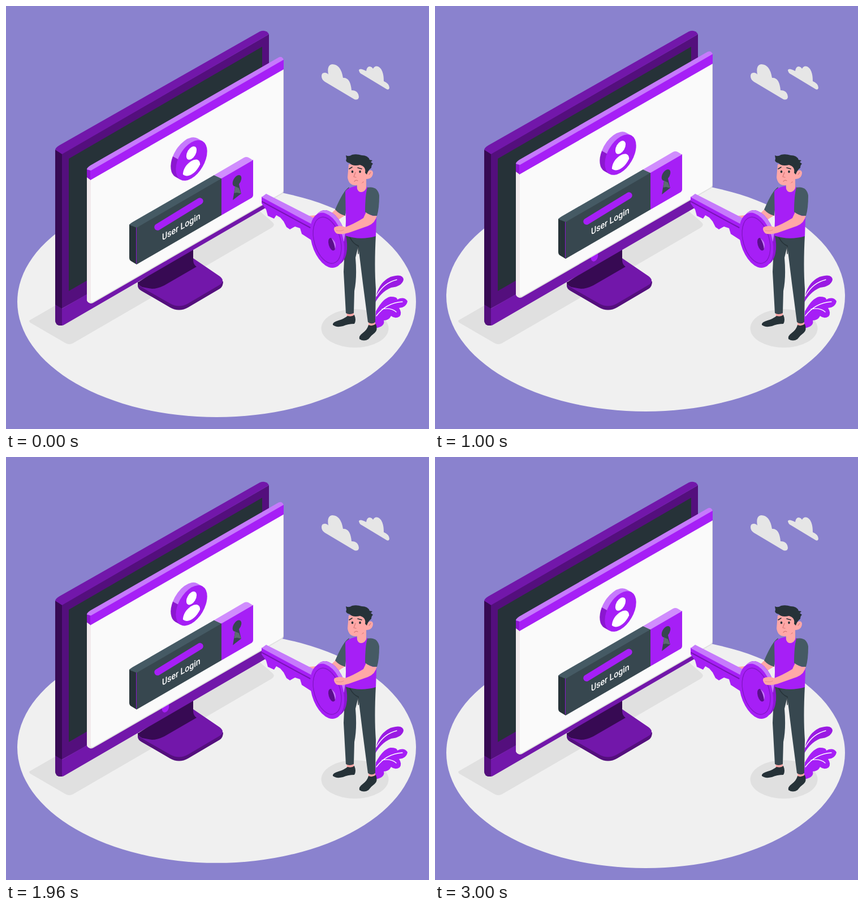
An HTML page that plays this animation: 748x748 px, repeating every 3040 ms.

```html
<!DOCTYPE html>
<html lang="en">
<head>
<meta charset="utf-8">
<title>User Login</title>
<style>
html, body { margin: 0; width: 100%; height: 100%; overflow: hidden; background: #8a82ce; }
svg { display: block; width: 100%; height: 100%; }
text { font: 500 16.3px Roboto, sans-serif; fill: #fff; }
.main { fill: #a61ff6; }
.light { fill: #c67afc; }
.deep { fill: #8b17cf; }
.mid { fill: #7217aa; }
.dark { fill: #540f7d; }
.night { fill: #370a53; }
.ink { fill: #263238; }
.slate { fill: #37474f; }
.steel { fill: #455a64; }
.skin { fill: #ffa8a7; }
.shade { fill: #e0e0e0; }
.cloud { fill: #e6e6e6; }
.line { fill: none; stroke-linecap: round; stroke-linejoin: round; }
</style>
</head>
<body>
<svg viewBox="0 0 748 748">
  <ellipse id="floor" cx="372.5" cy="523" rx="352.5" ry="204" fill="#f0f0f0"/>

  <g class="shade">
    <path d="M43 555L420 338L471 382Q477 387 470 392L119 596Q112 600 105 596L43 560Q39 557 43 555Z"/>
    <ellipse cx="617" cy="570" rx="59.5" ry="34"/>
  </g>

  <g id="clouds" class="cloud">
    <path d="M558 124Q558 117 565 118Q569 119 570 121Q567 104 577 103Q592 103 596 127Q609 126 611 149Q623 149 624 161Q623 167 616 165L564 134Q558 130 558 124Z"/>
    <path d="M624 113Q626 109 637 115Q638 108 642 107Q647 107 649 111Q652 105 658 107Q668 112 668 133Q678 137 678 145Q677 149 673 147L630 121Q624 118 624 113Z"/>
  </g>

  <g id="monitor">
    <path class="dark" d="M233 488L233 495Q233 500 240 504L290 533Q306 542 322 533L378 500Q384 496 384 487Z"/>
    <path class="mid" d="M233 489L331 446L378 478Q388 486 378 493L322 526Q306 535 290 526L239 497Q233 493 233 489Z"/>
    <path class="night" d="M233 489L274 462L331 428V449Q331 457 337 461L280 494Q268 500 258 500L241 497Q233 493 233 489Z"/>
    <path class="night" d="M87 254L99 261V565Q87 566 87 555Z"/>
    <path class="dark" d="M87 528L99 535V565Q87 566 87 555Z"/>
    <path class="dark" d="M99 261L465 50V330L99 535Z"/>
    <path class="mid" d="M87 254Q88 250 95 246L449 45Q460 41 465 50L99 262Z"/>
    <path class="ink" d="M111 270L453 72V307L111 504Z"/>
    <path class="mid" d="M99 535L465 324V345Q465 353 459 357L104 563Q101 565 99 565Z"/>
    <ellipse class="main" cx="282" cy="443" rx="6" ry="9" transform="rotate(18 282 443)"/>
  </g>

  <g id="panel">
    <path class="shade" d="M143 300L151 307L491 111V327Q491 331 487 333L154 525Q150 527 147 525Q143 523 143 519Z"/>
    <path fill="#f1e9ec" d="M143 302L150 307V525Q143 524 143 519Z"/>
    <path fill="#fafafa" d="M150 307L490 111V326Q490 329 487 331L154 523Q150 525 150 521Z"/>
    <path class="deep" d="M143 287L150 290V308L143 303Z"/>
    <path class="main" d="M149 290L491 94V112L149 308Z"/>
    <path class="light" d="M143 289Q143 286 149 282L482 91Q488 88 491 95L150 291Z"/>

    <g transform="matrix(.866 -.5 0 1 328 273)">
      <path class="light" d="M-27.7-16L-38.1-26.2A32 32 0 0 1 12.2-32.8L22.6-22.6Z"/>
      <path class="deep" d="M-27.7-16L-38.1-26.2A32 32 0 0 0-33 12.4L-22.6 22.6Z"/>
      <circle class="main" r="32"/>
      <g fill="#fff">
        <circle cy="-13" r="10.5"/>
        <path d="M-17.5 16C-17-4 17-4 17.5 16C8 28-8 28-17.5 16Z"/>
      </g>
    </g>

    <path class="ink" d="M218 386L231 391V457L221 451Q218 449 218 445Z"/>
    <path class="slate" d="M231 391L381 304V370L231 457Z"/>
    <path class="steel" d="M218 387Q219 385 224 382L368 299L381 305L231 392Z"/>
    <path class="main" d="M381 304L437 272V334Q437 338 433 340L381 370Z"/>
    <path d="M368 299L421 268Q425 266 429 268L434 271Q437 273 436 273L381 305Z" fill="#d08dfd"/>
    <path class="line" d="M230.5 392V455" stroke="#8b17cf"/>
    <path class="line" d="M268 391L343 345" stroke="#a61ff6" stroke-width="11.5"/>
    <g transform="matrix(.866 -.5 0 1 408.5 310)">
      <path class="slate" d="M-4 7A9 9 0 1 1 4 7L8.5 26L-8.5 29Z"/>
      <path fill="#5c6a72" d="M-4 7L4 14L8.5 26L0 20L-6 18Z"/>
    </g>
    <text transform="matrix(.866 -.5 0 1 276 415)">User Login</text>
  </g>

  <g id="plant">
    <path fill="#9a1be3" d="M653 524Q655 491 680 479Q702 472 703 484Q700 496 681 498Q664 505 653 524Z"/>
    <path class="main" d="M652 570L654 540Q667 516 680 514Q692 514 692 519Q704 513 710 522Q708 533 695 534Q701 543 696 549Q688 554 681 548Q677 556 668 556Q671 567 652 570Z"/>
    <path class="line" d="M655 513Q667 490 691 484M655 548Q672 525 701 523M665 536Q681 533 690 541" stroke="#fff" stroke-width="1.3"/>
  </g>

  <g id="man">
    <path class="skin" d="M582 360L574 368L535 371Q527 367 525 371Q527 376 540 378L586 379L600 370Z"/>
    <g class="skin">
      <path d="M602 540H615V549L603 551ZM641 556H653V566L641 567Z"/>
      <path d="M606 280L604 303Q606 317 618 317L621 317V332H637V306Q648 306 649 295Q648 288 640 292L637 280Z"/>
    </g>
    <g class="ink">
      <path d="M604 548Q612 550 616 546Q620 556 616 562Q605 562 596 566Q584 569 578 564Q577 559 588 556Q598 553 604 548Z"/>
      <path d="M641 564Q648 567 654 562Q658 573 652 578Q645 583 641 589Q633 594 625 589Q623 584 631 578Q639 572 641 564Z"/>
      <path d="M601 264Q606 267 612 263Q620 261 629 264Q640 264 643 272L648 273L645 276L649 279Q646 281 646 286Q640 291 638 298L635 295Q637 284 626 281Q613 284 608 278Q599 276 602 270Z"/>
      <ellipse cx="612.5" cy="293" rx="1.8" ry="2.2"/>
      <ellipse cx="626" cy="293" rx="1.8" ry="2.2"/>
    </g>
    <path class="line" d="M607 288L612 285M622 286L629 288" stroke="#263238" stroke-width="1.6"/>
    <path class="line" d="M618 294L615 302L619 303M616 310Q619 307 622 309M621 317Q628 316 632 311M642 298L645 294" stroke="#d97878" stroke-width="1.2"/>
    <path class="slate" d="M600 403Q628 414 654 405Q651 460 654 500L653 559Q647 564 640 559L631 490L623 425L618 445Q621 480 616 504L615 543Q607 547 601 543L597 470Z"/>
    <path class="line" d="M608 409Q614 421 623 424V438" stroke="#263238" stroke-width="1.5"/>
    <path class="steel" d="M607 320Q597 325 582 360Q589 368 600 371L603 340Z"/>
    <path class="main" d="M600 328Q604 321 620 318Q621 329 628 329Q635 328 638 320L648 323Q656 340 655 378L654 407Q626 415 600 406L601 380Z"/>
    <path class="skin" d="M621 316Q620 328 627 329Q634 329 636 323V311Z"/>
  </g>

  <g id="key">
    <path class="main" d="M452 337L543 384V416L523 403L520 393L511 390L502 395L496 391L491 381L485 374L478 370L474 376L463 371L460 360L452 349Z"/>
    <path class="light" d="M452 338L460 332L548 377L543 387Z"/>
    <path class="line" d="M453 346L538 392" stroke="#7814b5" stroke-width="2"/>
    <g transform="rotate(-16 569 414)">
      <ellipse class="deep" cx="574" cy="411" rx="28" ry="50"/>
      <path class="light" d="M546 411A28 50 0 0 1 602 411L596 424L544 390Z"/>
      <ellipse class="main" cx="568" cy="414" rx="28" ry="50"/>
      <ellipse class="line" cx="568" cy="414" rx="23" ry="42" stroke="#8517c9" stroke-width="1.5"/>
      <ellipse fill="#5b0f8c" cx="574" cy="423" rx="5.7" ry="11.5"/>
      <path class="light" d="M576 412Q584 422 577 433Q579 422 576 412Z"/>
    </g>
  </g>

  <g id="near-arm">
    <path class="skin" d="M637 364Q648 374 656 370Q653 384 640 389L606 401Q590 405 584 402Q578 396 581 391Q590 387 600 391Q614 386 632 375Z"/>
    <path class="line" d="M584 397Q592 399 597 396" stroke="#e88b8b"/>
    <path class="steel" d="M639 321Q657 318 660 335Q660 358 656 371Q645 372 635 364Q635 335 639 321Z"/>
  </g>
</svg>
<script>
const panel = document.getElementById('panel');
const floor = document.getElementById('floor');
const LOOP = 3040, FPS = 24, LIFT = 14.96;

// Linear rise and fall over one period, in seconds
const bob = (time, period) => {
  const phase = time / period % 1;
  return -LIFT * (1 - Math.abs(2 * phase - 1));
};
const shift = (node, y) => node.setAttribute('transform', `translate(0 ${y.toFixed(3)})`);

let start;
function draw(now) {
  start ??= now;
  const ms = (now - start) % LOOP;
  const time = Math.floor(ms * FPS / 1000 + .1) / FPS;
  shift(panel, bob(time, 3));
  shift(floor, bob(time, 1.5));
  requestAnimationFrame(draw);
}
requestAnimationFrame(draw);
</script>
</body>
</html>
```
